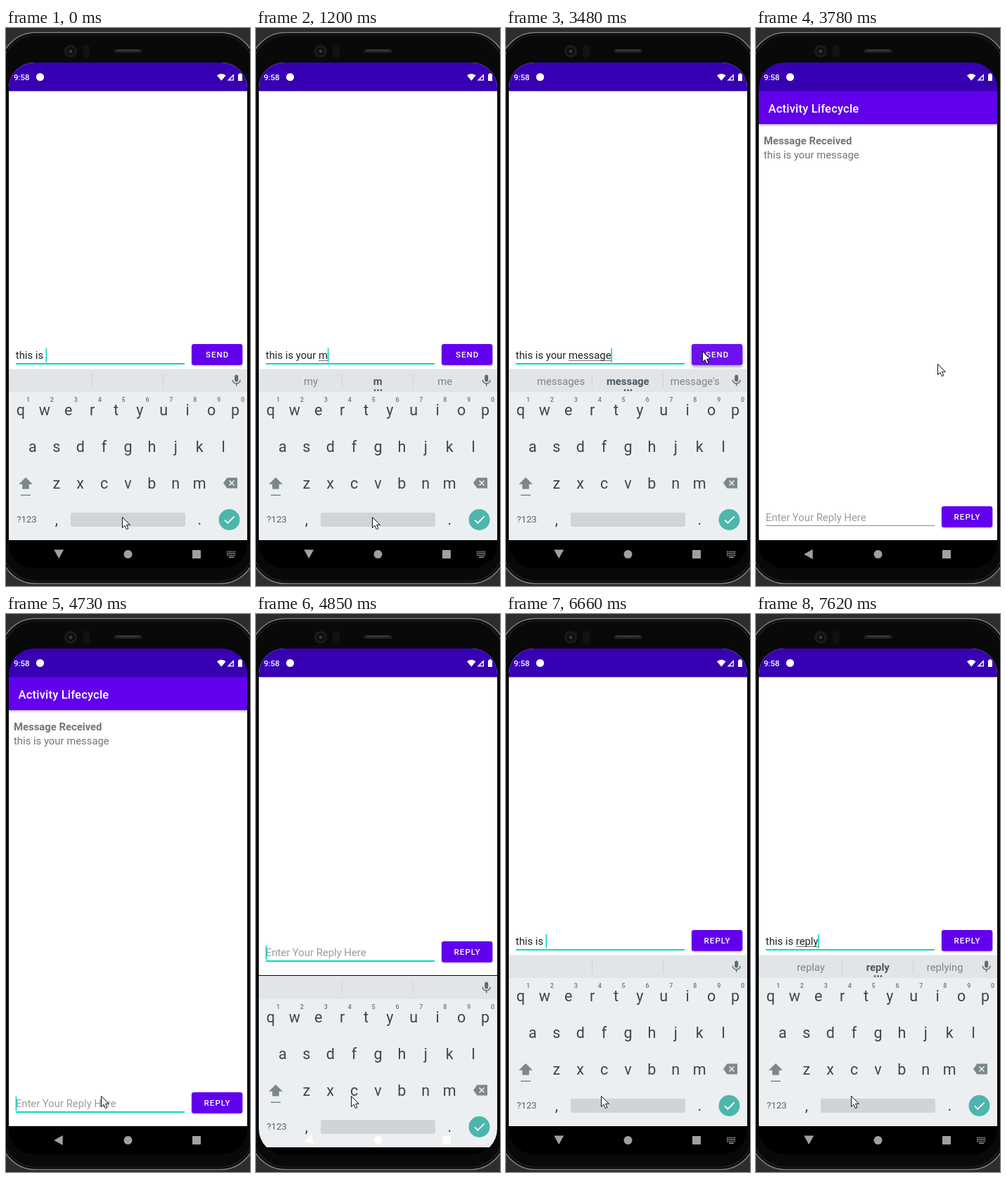
An HTML page with a canvas that plays this animation: 347 by 791 pixels, repeating every 8000 ms.

```html
<!DOCTYPE html>
<html lang="en">
<head>
<meta charset="utf-8">
<title>Message and reply</title>
<style>
html, body { margin: 0; width: 100%; height: 100%; overflow: hidden; background: #2d2d2e; }
canvas { display: block; }
</style>
</head>
<body>
<canvas id="stage" width="347" height="791"></canvas>
<script>
const c = document.getElementById('stage').getContext('2d');
const LOOP = 8000, FRAME = 120, PAN = 230, KEYBOARD = 243;
const PRESS = 3230, OPEN = 3630, OPENED = 3780, FOCUS = 4610, SLIDE = 4747;
const PURPLE = '#6200ee', TEAL = '#03dac5', INK = '#37474f', MUTED = '#78858b', GREY = '#7b878c';

// time, typed text, word suggestions
const typing = [
  [0, 'this is ', ''],
  [150, 'this is y', 'you|y|your'],
  [280, 'this is yo', 'you|yo|your'],
  [410, 'this is you', 'yours|you|your'],
  [540, 'this is your', 'yours|you|your'],
  [670, 'this is your', 'yours|your|you'],
  [810, 'this is your ', ''],
  [1200, 'this is your m', 'my|m|me'],
  [1335, 'this is your me', 'men|me|met'],
  [1470, 'this is your mes', 'mess|mes|mesh'],
  [1605, 'this is your mess', 'message|mess|messy'],
  [1740, 'this is your messa', 'messages|messa|message'],
  [1870, 'this is your messag', 'messages|messag|message'],
  [2000, 'this is your message', "messages|message|message's"],
  [4610, '', ''],
  [5360, 't', ''],
  [5490, 'th', 'to|t|the'],
  [5620, 'thi', 'the|th|this'],
  [5740, 'this', 'thing|this|think'],
  [6005, 'this ', ''],
  [6135, 'this i', 'in|i|is'],
  [6270, 'this is', "it|is|isn't"],
  [6530, 'this is ', ''],
  [6810, 'this is r', 'are|r|right'],
  [6945, 'this is re', 'red|re|really'],
  [7080, 'this is rep', 'replace|rep|report'],
  [7480, 'this is repl', 'replace|repl|reply'],
  [7620, 'this is reply', 'replay|reply|replying']
];

// start, end, steps, from, to
const moves = [
  [2150, 2450, 3, [165, 693], [168, 717]],
  [2580, 3230, 6, [168, 717], [279, 458]],
  [3630, 3780, 2, [279, 458], [258, 476]],
  [3900, 4330, 4, [258, 476], [135, 683]]
];

function rect(x, y, w, h, fill, r = 0) {
  c.fillStyle = fill;
  c.beginPath();
  c.roundRect(x, y, w, h, r);
  c.fill();
}

function disc(x, y, r, fill) {
  c.fillStyle = fill;
  c.beginPath();
  c.arc(x, y, r, 0, 7);
  c.fill();
}

function shape(path, fill, stroke, width = 1) {
  const p = new Path2D(path);
  if (fill) { c.fillStyle = fill; c.fill(p); }
  if (stroke) { c.strokeStyle = stroke; c.lineWidth = width; c.stroke(p); }
}

function label(text, x, y, size, fill, weight = 400, align = 'left', spacing = 0) {
  c.font = `${weight} ${size}px Roboto, sans-serif`;
  c.letterSpacing = spacing + 'px';
  c.textAlign = align;
  c.fillStyle = fill;
  c.fillText(text, x, y);
}

function shadowed(blur, offset, alpha, draw) {
  c.save();
  c.shadowColor = `rgba(0,0,0,${alpha})`;
  c.shadowBlur = blur;
  c.shadowOffsetY = offset;
  draw();
  c.restore();
}

function clipped(x, y, w, h, r, draw) {
  c.save();
  c.beginPath();
  c.roundRect(x, y, w, h, r);
  c.clip();
  draw();
  c.restore();
}

function rim(inset, radius, color, width) {
  c.beginPath();
  c.roundRect(inset - 8, 6.5 + inset, 363 - 2 * inset, 781 - 2 * inset, radius);
  c.strokeStyle = color;
  c.lineWidth = width;
  c.stroke();
}

function drawBody() {
  rect(0, 0, 347, 791, '#2d2d2e');
  rect(-8, 6.5, 363, 781, '#09090a', 50);
  rim(0, 50, '#7c7c7c', 1.5);
  rim(3.5, 47, '#252526', 1.2);
  disc(92, 33, 9, '#1b1b1c');
  disc(92, 33, 5.5, '#0c0c0d');
  disc(92, 33, 2.5, '#39393b');
  rect(109, 24, 10, 18, '#121213', 4);
  rect(154, 30, 39, 5, '#212122', 2.5);
  rect(157, 31, 33, 1.2, '#434344', 1);
}

function drawStatus() {
  rect(4, 49, 339, 40.4, '#3700b3');
  label('9:58', 10.9, 73.8, 11.5, '#fff', 500);
  disc(48.5, 69.5, 5.6, '#fff');
  shape('M300 67.3Q306.3 62 312.6 67.3L306.3 74.8Z', '#fff');
  shape('M314.5 74.5H324V65Z', '#fff');
  shape('M319.5 73.2H322.7V68.5L319.5 71.6Z', '#3700b3');
  shape('M330 65.6H331.7V64.2H334.4V65.6H336V75H330Z', '#fff');
}

function drawPage(p) {
  c.save();
  c.translate(0, PAN - p.pan);
  rect(4, -141, 339, 637, '#fff');
  if (p.received) {
    shadowed(3, 1.3, .25, () => rect(4, -141, 339, 47.2, PURPLE));
    label('Activity Lifecycle', 17.5, -110.3, 16.5, '#fff', 500, 'left', .2);
    label('Message Received', 11, -64.8, 14.85, '#757575', 700);
    label('this is your message', 11, -44.8, 14.85, '#757575');
  }
  rect(14, 475.1, 240, p.focused ? 1.8 : 1, p.focused ? TEAL : '#8a8a8a');
  label(p.text || 'Enter Your Reply Here', 13.8, 469.3, 14.85, p.text ? '#212121' : '#9b9b9b');
  const end = 13.8 + (p.text ? c.measureText(p.text).width : 0);
  if (p.composing) {
    const start = 13.8 + c.measureText(p.text.slice(0, p.text.lastIndexOf(' ') + 1)).width;
    rect(start, 471, end - start, .8, '#444');
  }
  if (p.caret) rect(end - .2, 454, 1.6, 20, TEAL);
  shadowed(p.pressed ? 5 : 2.5, p.pressed ? 2.5 : 1.3, p.pressed ? .4 : .26,
    () => rect(264, 448, 72.3, 29.7, p.pressed ? '#6c10ef' : PURPLE, 3.3));
  label(p.button, 300.6, 467.4, 11.55, '#fff', 500, 'center', 1.03);
  c.restore();
}

function drawKeyboard(offset, words, bold) {
  c.save();
  c.translate(0, offset);
  if (offset) rect(4, 482, 339, 1.2, '#000');
  rect(4, 483, 339, 243, '#eceff1');
  rect(4, 483, 339, 33, '#e1e5e8');
  rect(4, 483, 339, 1, '#eef0f1');
  rect(122, 490, 1, 20, '#ccd2d5');
  rect(223, 490, 1, 20, '#ccd2d5');
  rect(325.2, 491.5, 5, 10, '#5f6b70', 2.5);
  shape('M322.3 498.7A5.4 5.4 0 0 0 333.1 498.7M327.7 504V507.5', null, '#5f6b70', 1.5);

  if (words) {
    words.split('|').forEach((word, i) =>
      label(word, [78, 173.3, 268.7][i], 505.7, 14.85, i === 1 ? '#4b5a61' : MUTED,
        i === 1 && bold ? 700 : 400, 'center'));
    for (let i = -1; i < 2; i++) disc(173.5 + i * 4.5, 513.4, 1.3, '#4b5a61');
  }

  [['qwertyuiop', 20.9], ['asdfghjkl', 37.9], ['zxcvbnm', 71.8]].forEach(([keys, x], row) =>
    [...keys].forEach((key, i) => label(key, x + 33.9 * i, 549 + 52 * row, 21.5, INK, 400, 'center')));
  [...'1234567890'].forEach((d, i) => label(d, 31.5 + 33.9 * i, 530, 9, '#66757c', 500, 'center'));

  shape('M28 637L37.8 646.8H32.8V653.6H23.2V646.8H18.2Z', GREY);
  rect(21, 661.5, 14, 1.4, GREY);
  shape('M314.5 637.5H329V652.5H314.5L309 645Z', GREY);
  shape('M317.5 641.5L324.5 648.5M324.5 641.5L317.5 648.5', null, '#eceff1', 1.6);
  label('?123', 29.5, 701.3, 13.2, '#55646b', 400, 'center');
  label(',', 71.8, 703.5, 21.5, INK, 400, 'center');
  rect(92, 687, 163, 20, '#cfd4d7', 3);
  label('.', 275.3, 703.5, 21.5, INK, 400, 'center');
  disc(317.5, 697, 15, '#4db6ac');
  shape('M311 697.3L315.4 701.7L324.8 692.3', null, '#fff', 1.7);
  c.restore();
}

function drawNav(turn, color, iconAlpha) {
  c.save();
  c.translate(75.2, 746 - turn);
  c.rotate(-Math.PI / 2 * turn);
  shape('M-7 0L5.5 -7V7Z', color);
  c.restore();
  disc(173.5, 746, 6, color);
  rect(265, 740, 12, 12, color, 1);
  c.globalAlpha = iconAlpha;
  for (let y = 0; y < 3; y++)
    for (let x = 0; x < 5; x++) rect(314 + x * 2.6, 741.5 + y * 2.6, 1.7, 1.7, color);
  rect(317, 749.5, 7, 1.4, color);
  c.globalAlpha = 1;
}

function drawPointer(t) {
  let [x, y] = moves[0][3];
  for (const [start, end, steps, from, to] of moves) {
    if (t < start) break;
    const step = Math.floor((t - start) / (end - start) * (steps - 1) + 1.001);
    const p = Math.min(1, step / steps);
    const k = p * p * (3 - 2 * p);
    x = from[0] + (to[0] - from[0]) * k;
    y = from[1] + (to[1] - from[1]) * k;
  }
  c.save();
  c.translate(x, y);
  shape('M.5 .5V15.5L3.9 12.2L6.4 17.7L8.9 16.6L6.5 11.3H11.3Z', '#fff', '#111');
  c.restore();
}

function draw(t) {
  const [typedAt, text, words] = typing.findLast(s => s[0] <= t);
  const center = words.split('|')[1];
  const bold = !!center && text.endsWith(center);
  const caret = Math.floor((t - typedAt) / 500) % 2 === 0;
  const opened = t >= OPEN, replying = t >= FOCUS;

  const held = FOCUS + Math.floor((t - FOCUS) / FRAME) * FRAME;
  const left = 1 - Math.min(1, Math.max(0, (held - SLIDE) / 250));
  const pan = PAN - Math.round(PAN * left ** 5);
  const drop = Math.ceil(KEYBOARD * left ** 4);

  drawBody();
  clipped(4, 49, 339, 717, 36, () => {
    rect(4, 726, 339, 40, '#000');
    if (!opened) {
      drawPage({ pan: PAN, text, focused: true, caret, composing: bold, button: 'SEND', pressed: t >= PRESS });
    } else {
      const rise = t < OPENED ? 14 : 0;
      clipped(4, 49, 339, 677, 0, () => drawPage({
        pan: pan - rise, text: replying ? text : '', focused: replying, caret: replying && caret,
        composing: replying && bold, button: 'REPLY', received: true
      }));
    }
    if (!opened || left < 1) drawKeyboard(opened ? drop : 0, words, bold);
    drawStatus();

    if (!opened || left === 0) drawNav(1, '#a0a0a0', .9);
    else if (left < 1) drawNav(.2, 'rgba(255,255,255,.8)', .4);
    else drawNav(0, '#a0a0a0', 0);
  });
  drawPointer(t);
}

function tick() {
  draw(performance.now() % LOOP);
  requestAnimationFrame(tick);
}
tick();
</script>
</body>
</html>
```
